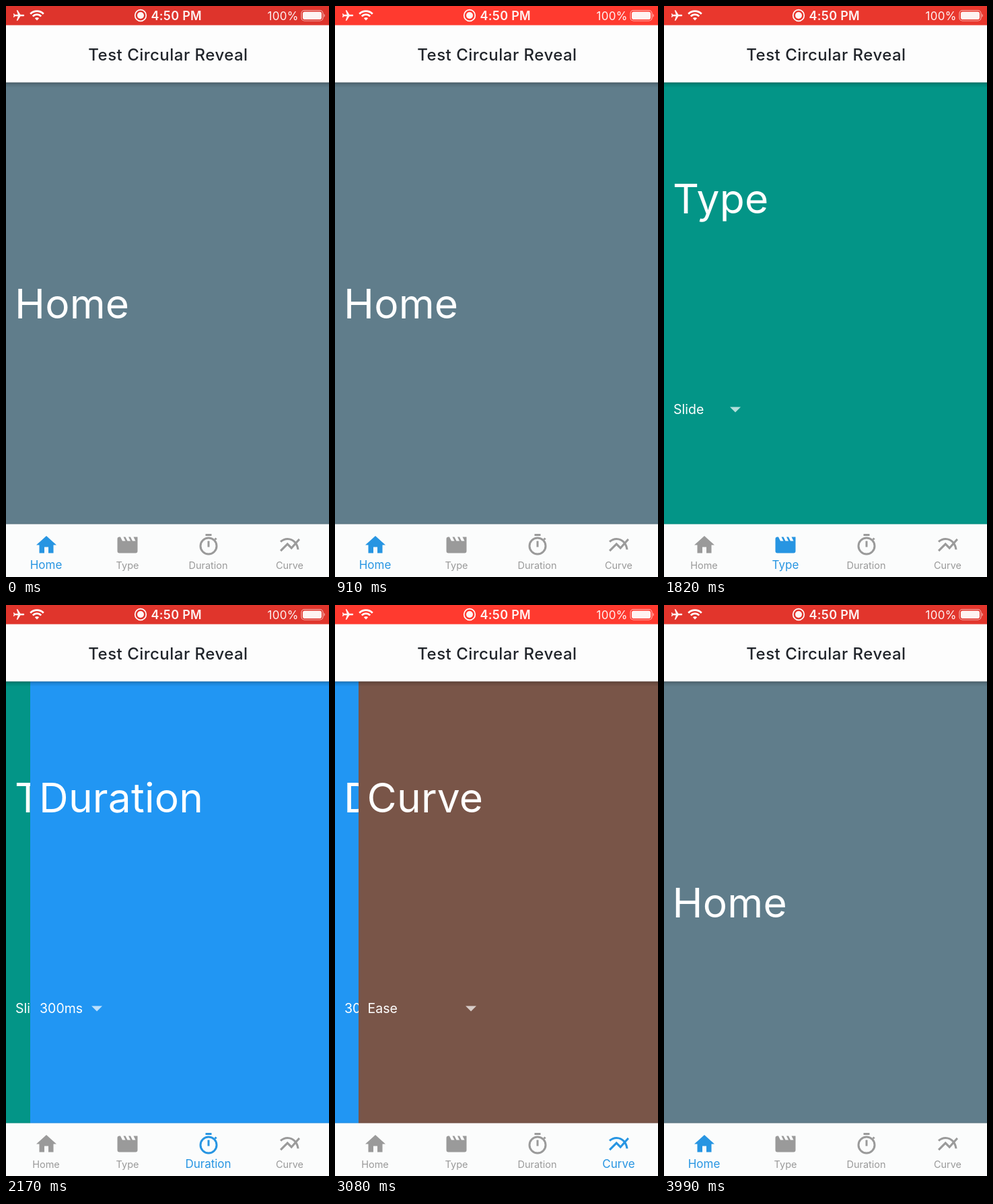
An HTML page for the animation above (4.06 s loop, 480x848 px).

```html
<!DOCTYPE html>
<html lang="en">
<head>
<meta charset="utf-8">
<title>Test Circular Reveal</title>
<style>
  html, body { margin: 0; width: 100%; height: 100%; overflow: hidden; background: #fdfdfd; }
  svg { display: block; width: 100vw; height: 100vh; font-family: Inter, "Liberation Sans", sans-serif; }

  .status, .page, .tab, .ripple { animation: 4060ms linear infinite; }
  .status { fill: #de342c; animation-name: pulse; animation-duration: 2030ms; }
  @keyframes pulse {
    0%, 100% { fill: #de342c; }
    30% { fill: #e6372e; }
    45%, 58% { fill: #ff3a2f; }
    83% { fill: #f0392e; }
  }

  .page { fill: #fff; }
  .big { font-size: 60.5px; letter-spacing: .2px; }
  .choice { font-size: 19.5px; }
  .arrow { opacity: .7; }
  .from-right { transform: translateX(480px); }
  .from-left { transform: translateX(-480px); }
  .type { animation-name: show-type; }
  .duration { animation-name: show-duration; }
  .curve { animation-name: show-curve; }
  .return { animation-name: show-home; }
  @keyframes show-type {
    0%, 25.62% { transform: translateX(480px); animation-timing-function: ease; }
    33.37%, 100% { transform: none; }
  }
  @keyframes show-duration {
    0%, 48.28% { transform: translateX(480px); animation-timing-function: ease; }
    56.03%, 100% { transform: none; }
  }
  @keyframes show-curve {
    0%, 70.64% { transform: translateX(480px); animation-timing-function: ease; }
    78.4%, 100% { transform: none; }
  }
  @keyframes show-home {
    0%, 90.98% { transform: translateX(-480px); animation-timing-function: ease; }
    98.57%, 100% { transform: none; }
  }

  .tab { --on: #2795e2; --off: #9a9a9a; color: var(--off); fill: currentColor; font-size: 14.5px;
         text-anchor: middle; animation-timing-function: cubic-bezier(.4, 0, .2, 1); }
  .tab-home { animation-name: pick-home; }
  .tab-type { animation-name: pick-type; }
  .tab-duration { animation-name: pick-duration; }
  .tab-curve { animation-name: pick-curve; }
  @keyframes pick-home {
    0%, 25.1%, 95.6%, 100% { color: var(--on); font-size: 17px; }
    30.3%, 90.4% { color: var(--off); font-size: 14.5px; }
  }
  @keyframes pick-type {
    0%, 25.1%, 53%, 100% { color: var(--off); font-size: 14.5px; }
    30.3%, 47.8% { color: var(--on); font-size: 17px; }
  }
  @keyframes pick-duration {
    0%, 47.8%, 75.3%, 100% { color: var(--off); font-size: 14.5px; }
    53%, 70.1% { color: var(--on); font-size: 17px; }
  }
  @keyframes pick-curve {
    0%, 70.1%, 95.6%, 100% { color: var(--off); font-size: 14.5px; }
    75.3%, 90.4% { color: var(--on); font-size: 17px; }
  }

  .ripple { opacity: 0; transform-box: fill-box; transform-origin: center; animation-name: ripple; }
  @keyframes ripple {
    0% { opacity: 0; transform: scale(.1); }
    1.5% { opacity: .09; }
    3% { opacity: .09; transform: scale(1); }
    7% { opacity: 0; transform: scale(1.25); }
    100% { opacity: 0; transform: scale(1.25); }
  }
</style>
</head>
<body>
<svg viewBox="0 0 480 848" preserveAspectRatio="none">
  <defs>
    <linearGradient id="shade" x2="0" y2="1">
      <stop stop-opacity=".32"/>
      <stop offset=".4" stop-opacity=".12"/>
      <stop offset="1" stop-opacity="0"/>
    </linearGradient>
    <clipPath id="bar"><rect y="769.5" width="480" height="79"/></clipPath>
    <path id="arrow" class="arrow" d="M0 595.5h16l-8 8z"/>
    <g id="home">
      <rect y="113" width="480" height="657" fill="#607d8b"/>
      <text class="big" x="13" y="464">Home</text>
    </g>
  </defs>

  <g class="page"><use href="#home"/></g>
  <g class="page from-right type">
    <rect y="113" width="480" height="657" fill="#039587"/>
    <text class="big" x="13" y="308">Type</text>
    <text class="choice" x="14" y="606">Slide</text>
    <use href="#arrow" x="98"/>
  </g>
  <g class="page from-right duration">
    <rect y="113" width="480" height="657" fill="#2196f3"/>
    <text class="big" x="13" y="308">Duration</text>
    <text class="choice" x="14" y="606">300ms</text>
    <use href="#arrow" x="91"/>
  </g>
  <g class="page from-right curve">
    <rect y="113" width="480" height="657" fill="#795548"/>
    <text class="big" x="13" y="308">Curve</text>
    <text class="choice" x="14" y="606">Ease</text>
    <use href="#arrow" x="159.5"/>
  </g>
  <g class="page from-left return"><use href="#home"/></g>

  <!-- App bar -->
  <rect y="113" width="480" height="8" fill="url(#shade)"/>
  <rect y="28" width="480" height="85.5" fill="#fdfdfd"/>
  <text x="241" y="80.5" font-size="24" font-weight="500" letter-spacing=".48" text-anchor="middle" fill="#20242a">Test Circular Reveal</text>

  <!-- Status bar -->
  <rect class="status" width="480" height="28.5"/>
  <g fill="#fff" fill-opacity=".94">
    <path transform="translate(19 14) rotate(90) scale(.82) translate(-11.5 -12)"
      d="M21 16v-2l-8-5V3.5c0-.83-.67-1.5-1.5-1.5S10 2.67 10 3.5V9l-8 5v2l8-2.5V19l-2 1.5V22l3.5-1 3.5 1v-1.5L13 19v-5.5l8 2.5z"/>
    <path d="M46 21.5l-3.2-3.2a4.6 4.6 0 0 1 6.4 0z"/>
    <path d="M39.8 15.3a8.7 8.7 0 0 1 12.4 0M36.2 11.7a13.9 13.9 0 0 1 19.6 0" fill="none" stroke="#fff" stroke-width="2.8"/>
    <circle cx="200" cy="14" r="8.3" fill="none" stroke="#fff" stroke-width="1.7"/>
    <circle cx="200" cy="14" r="5"/>
    <text x="215.5" y="20.5" font-size="18" font-weight="600" letter-spacing=".3">4:50 PM</text>
    <text x="388.5" y="20.5" font-size="17" letter-spacing=".3">100%</text>
    <rect x="439" y="6.5" width="32" height="15.5" rx="4.5" fill="none" stroke="#fff" stroke-opacity=".6" stroke-width="1.2"/>
    <rect x="441" y="8.5" width="28" height="11.5" rx="2.8"/>
    <path d="M472.5 11.5q3 2.7 0 5.5z" fill-opacity=".6"/>
  </g>

  <!-- Bottom navigation -->
  <rect y="768.5" width="480" height="1" opacity=".1"/>
  <rect y="769.5" width="480" height="79" fill="#fbfcfc"/>
  <g clip-path="url(#bar)">
    <circle class="ripple" cx="180" cy="810" r="53" style="animation-delay: 936ms"/>
    <circle class="ripple" cx="301" cy="810" r="53" style="animation-delay: 1856ms"/>
    <circle class="ripple" cx="421" cy="810" r="53" style="animation-delay: 2764ms"/>
    <circle class="ripple" cx="60" cy="810" r="53" style="animation-delay: 3590ms"/>
  </g>
  <g class="tab tab-home">
    <path transform="translate(42 782.5) scale(1.5)" d="M10 20v-6h4v6h5v-8h3L12 3 2 12h3v8z"/>
    <text x="59.5" y="836">Home</text>
  </g>
  <g class="tab tab-type">
    <path transform="translate(162.5 782.5) scale(1.5)"
      d="M18 4l2 4h-3l-2-4h-2l2 4h-3l-2-4H8l2 4H7L5 4H4q-2 0-2 2v12q0 2 2 2h16q2 0 2-2V4z"/>
    <text x="180.5" y="836">Type</text>
  </g>
  <g class="tab tab-duration">
    <g transform="translate(283 782.5) scale(1.5)">
      <path d="M9 1h6v2H9zM11 8h2v6h-2zM17.6 6l1.4-1.4 1.4 1.4L19 7.4z"/>
      <circle cx="12" cy="13" r="8" fill="none" stroke="currentColor" stroke-width="2"/>
    </g>
    <text x="300.5" y="836">Duration</text>
  </g>
  <g class="tab tab-curve">
    <path transform="translate(404 782.5) scale(1.5)"
      d="M22 6.92l-1.41-1.41-2.85 3.21C15.68 6.4 12.83 5 9.61 5 6.72 5 4.07 6.16 2 8l1.42 1.42C5.12 7.93 7.27 7 9.61 7c2.74 0 5.09 1.26 6.77 3.24l-2.88 3.24-4-4L2 16.99l1.5 1.5 6-6.01 4 4 4.05-4.55c.75 1.35 1.25 2.9 1.44 4.55H21c-.22-2.3-.95-4.39-2.04-6.14z"/>
    <text x="421.5" y="836">Curve</text>
  </g>
</svg>
<script>
  // Advance every animation together in 70 ms steps, like a screen recording.
  const LOOP = 4060, STEP = 70, LEAD = 8;
  const animations = document.getAnimations();
  animations.forEach(a => a.pause());
  let start;
  function tick(now) {
    start ??= now;
    const time = Math.floor(((now - start + LEAD) % LOOP) / STEP) * STEP;
    animations.forEach(a => { a.currentTime = time; });
    requestAnimationFrame(tick);
  }
  requestAnimationFrame(tick);
</script>
</body>
</html>
```
